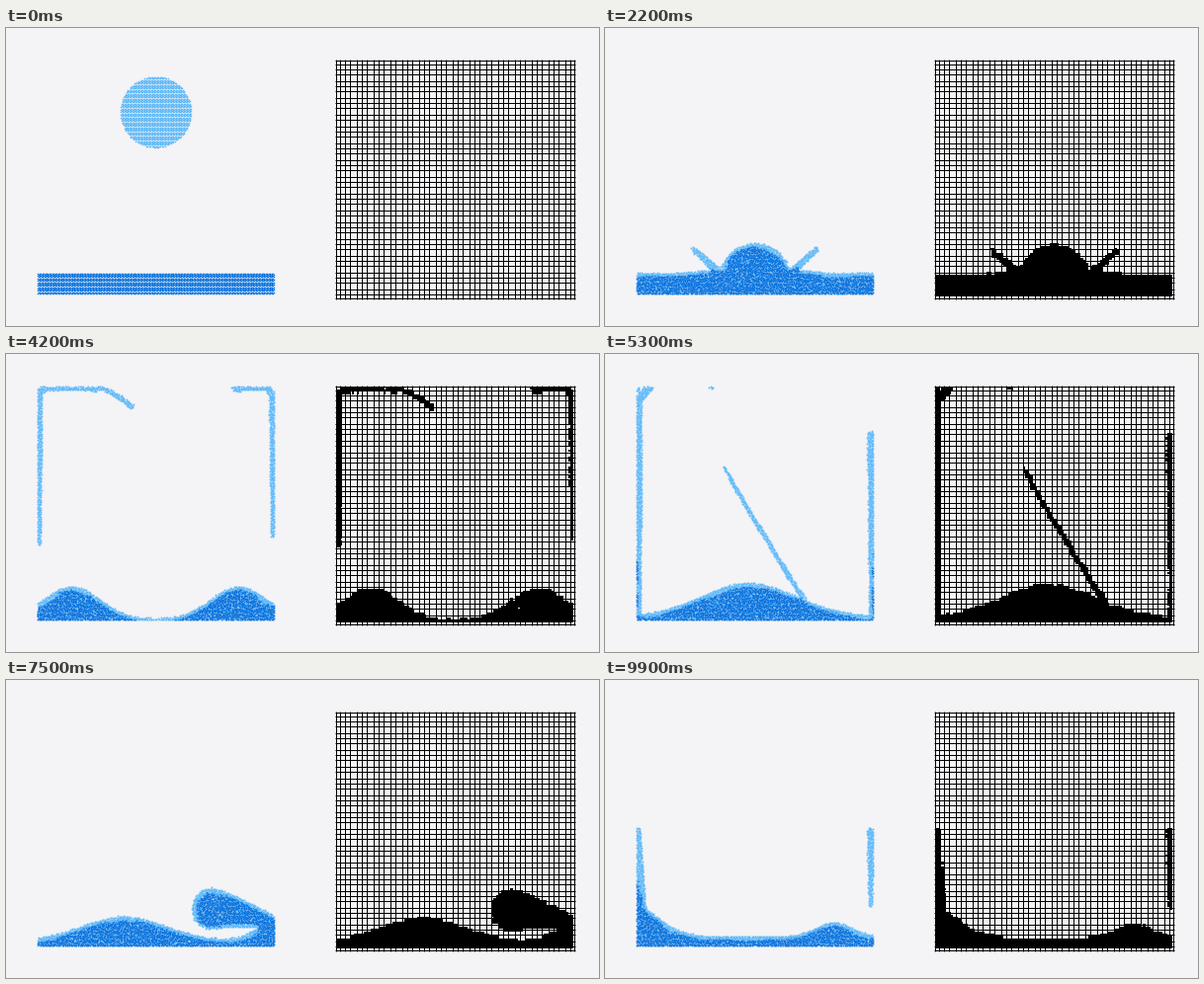
A matplotlib script for the animation above (10000 ms loop, 600 px wide and 302 px high).

```python
import numpy as np
import matplotlib.pyplot as plt
from matplotlib.animation import FuncAnimation
from matplotlib.collections import LineCollection

W, H, DPI = 600, 302, 100
FRAMES, STEP = 100, 100

PAPER = "#f4f3f5"
LIGHT = np.array([0.37, 0.73, 0.98])
DARK = np.array([0.04, 0.46, 0.88])

# tank on the left, cell grid on the right
X0, X1, Y0, Y1 = 32, 271.5, 33, 270
MID = 152
GX, GY, SIZE, CELLS = 333, 32, 242.5, 100
CELL = SIZE / CELLS
TO_GRID = np.array([302.5, 2.0])

BALL_Y, BALL_R = 85.5, 36
RELEASE, IMPACT, GRAVITY = 0.9, 2.02, 200

# two swells over a flat layer, eased from pose to pose:
# time, left and right centre, left and right height, widths, layer depth
POSES = np.array([
    (2.05, 112, 192, 0, 0, 20, 20, 22),
    (2.9, 32, 272, 41, 41, 52, 52, 8),
    (4.2, 67, 236, 33, 33, 40, 40, 1),
    (5.5, 140, 165, 24, 10, 65, 65, 4),
    (6.5, 150, 275, 30, 22, 38, 35, 3),
    (8.5, 90, 280, 18, 24, 80, 24, 9),
    (9.9, 25, 232, 34, 14, 38, 26, 10),
])

# hexagonal particle lattice filling the tank
DX, DY = 1.46, 1.265
PX, PY = np.meshgrid(np.arange(X0 + 0.7, X1, DX), np.arange(Y1 - 0.6, Y0, -DY))
PX[1::2] += DX / 2


def depth(t):
    """Depth of the pool above every lattice column."""
    times = POSES[:, 0]
    t = np.clip(t, times[0], times[-1])
    k = min(np.searchsorted(times, t, "right") - 1, len(times) - 2)
    u = (t - times[k]) / (times[k + 1] - times[k])
    u = u * u * (3 - 2 * u)
    c1, c2, h1, h2, w1, w2, base = (1 - u) * POSES[k, 1:] + u * POSES[k + 1, 1:]
    return (base + h1 * np.exp(-((PX - c1) / w1) ** 2)
            + h2 * np.exp(-((PX - c2) / w2) ** 2))


def stroke(xa, ya, wa, xb, yb, wb):
    """Lattice points inside a tapered round stroke."""
    vx, vy = xb - xa, yb - ya
    u = ((PX - xa) * vx + (PY - ya) * vy) / max(vx * vx + vy * vy, 1e-6)
    u = np.clip(u, 0, 1)
    gap = np.hypot(PX - xa - u * vx, PY - ya - u * vy)
    return gap < (wa + (wb - wa) * u) / 2


class Jet:
    """Water thrown from one spot for a while, ever more slowly."""

    def __init__(self, start, end, pos, vel, widths, fade=0.6):
        self.start, self.end, self.fade = start, end, fade
        self.pos, self.vel, self.widths = pos, vel, widths

    def mask(self, t):
        out = np.zeros(PX.shape, bool)
        if t <= self.start:
            return out
        span = self.end - self.start
        u = np.linspace(0, min(1, (t - self.start) / span), 14)
        age = t - self.start - u * span
        speed = 1 - self.fade * u
        x = self.pos[0] + self.vel[0] * speed * age
        y = self.pos[1] + self.vel[1] * speed * age + GRAVITY / 2 * age ** 2
        # what would pass the ceiling runs along it instead
        over = np.maximum(Y0 + 1 - y, 0)
        x = x + 0.45 * over * np.sign(MID - self.pos[0])
        x = np.clip(x, X0 + 1.5, X1 - 1.5)
        w = self.widths[0] + (self.widths[1] - self.widths[0]) * u
        dabs = list(zip(x, y + over, w))
        for a, b in zip(dabs, dabs[1:]):
            if min(a[1], b[1]) < Y1:
                out |= stroke(*a, *b)
        return out


JETS = [
    Jet(3.76, 4.4, (92, 34), (80, 0), (5, 3)),               # ceiling tongue
    Jet(5.9, 6.6, (160, 252), (78, -160), (9, 42), 0.3),     # central spout
    Jet(7.75, 8.9, (269, 229), (0, -250), (7, 3)),           # right wall
    Jet(9.2, 10, (33, 230), (0, -180), (6, 18)),             # left wall
]
for side in (-1, 1):
    JETS += [
        Jet(2.05, 2.4, (MID + 37 * side, 248), (165 * side, -170), (5, 12)),
        Jet(2.5, 3.2 + 0.15 * side, (MID + 118 * side, 225),
            (0, -344 + 13 * side), (8, 3)),
    ]
for x, start, drift in ((34, 5.1, 0), (107, 5.21, 13), (187, 5.36, 13)):
    JETS.append(Jet(start, start + (0.02 if drift else 0.1), (x, 34),
                    (drift, 0), (3, 3)))


def fullness(mask, r=3):
    """Share of filled neighbours around each lattice point."""
    n = 2 * r + 1
    pad = np.pad(mask.astype(float), r, mode="edge")
    s = np.pad(pad.cumsum(0).cumsum(1), ((1, 0), (1, 0)))
    return (s[n:, n:] - s[:-n, n:] - s[n:, :-n] + s[:-n, :-n]) / n ** 2


def particles(i):
    """Positions and a light/dark flag of every particle."""
    t = i * STEP / 1000
    rng = np.random.default_rng(100 + i)
    ball_y = BALL_Y + GRAVITY / 2 * max(t - RELEASE, 0) ** 2
    pts = np.dstack([PX, PY])
    mask = PY > Y1 - depth(t)
    if t < IMPACT:
        ball = np.hypot(PX - MID, PY - BALL_Y) < BALL_R
        xy = np.vstack([pts[mask], pts[ball] + [0, ball_y - BALL_Y]])
        light = np.arange(len(xy)) >= mask.sum()
    else:
        for jet in JETS:
            mask |= jet.mask(t)
        if t < IMPACT + 0.4:
            mask |= np.hypot(PX - MID, PY - ball_y) < BALL_R
        pts = pts + rng.uniform(-0.5, 0.5, pts.shape)
        swirl = np.sin(PX / 17 + 2 * np.sin(PY / 9 + t) + t)
        pale = fullness(mask) < 0.8 + 0.15 * (swirl > 0.6)
        pale |= PY + rng.normal(0, 6, PY.shape) < 206
        pale |= rng.random(PY.shape) < 0.04
        xy, light = pts[mask], pale[mask]
    # whole pixels keep the grain crisp
    xy = np.floor(np.clip(xy, [X0, Y0], [X1 - 0.5, Y1 - 0.5])) + 0.5
    return xy, light


def occupied(xy):
    idx = ((xy + TO_GRID - [GX, GY]) / CELL).astype(int)
    idx = np.clip(idx, 1, CELLS - 2)
    rgba = np.zeros((CELLS, CELLS, 4))
    rgba[idx[:, 1], idx[:, 0], 3] = 1
    return rgba


def grid_lines():
    """Cells are two pixels wide; spare pixels between them are lines."""
    edges = np.floor(np.arange(CELLS + 1) * CELL + 0.5)
    spare = edges[1:][np.diff(edges) > 2] - 0.5
    marks = np.concatenate([[0.5], spare, [SIZE - 0.5]])
    cols = [[(GX + m, GY), (GX + m, GY + SIZE)] for m in marks]
    rows = [[(GX, GY + m), (GX + SIZE, GY + m)] for m in marks]
    return cols + rows


fig = plt.figure(figsize=(W / DPI, H / DPI), dpi=DPI, facecolor=PAPER)
ax = fig.add_axes([0, 0, 1, 1])
ax.axis("off")

px = 72 / DPI
dots = ax.scatter([], [], marker="s", linewidths=0)
cells = ax.imshow(np.zeros((CELLS, CELLS, 4)), aspect="auto", zorder=1,
                  extent=(GX, GX + SIZE, GY + SIZE, GY),
                  interpolation="nearest")
ax.add_collection(LineCollection(grid_lines(), colors="black",
                                 linewidths=px, zorder=2))
ax.set_xlim(0, W)
ax.set_ylim(H, 0)
dots.set_snap(False)


def draw(i):
    t = i * STEP / 1000
    xy, light = particles(i)
    dots.set_offsets(xy)
    dots.set_sizes([((1.4 if t < IMPACT else 1.7) * px) ** 2])
    dots.set_facecolor(np.where(light[:, None], LIGHT, DARK))
    cells.set_data(occupied(xy if t >= RELEASE else xy[:0]))
    return dots, cells


anim = FuncAnimation(fig, draw, frames=FRAMES, interval=STEP,
                     init_func=lambda: draw(0), repeat=True)
plt.show()
```
